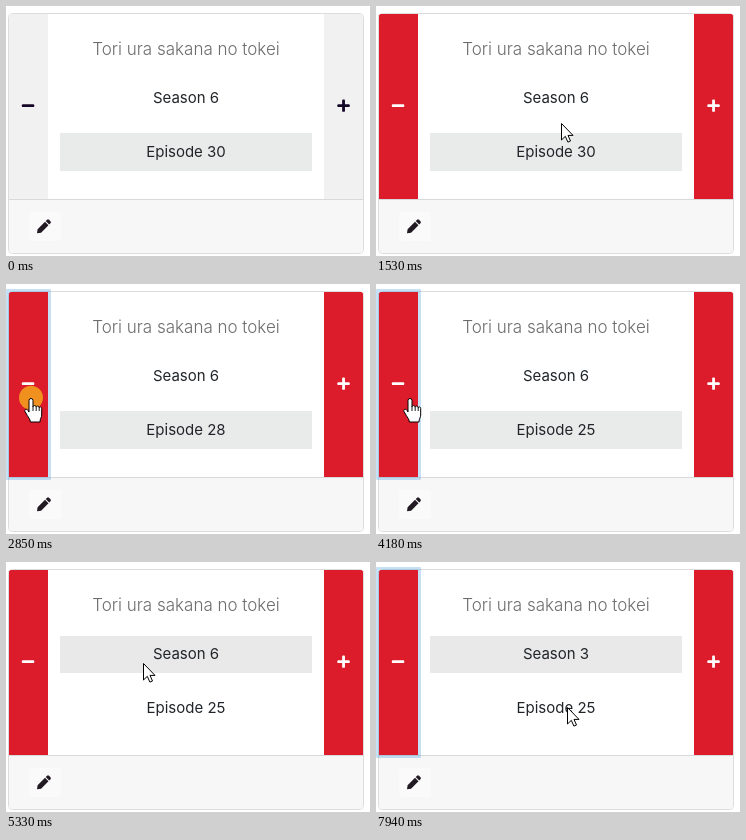
These frames come from a looping animation (364x250 px, 8 s). An HTML page:

```html
<!DOCTYPE html>
<html lang="en">
<head>
<meta charset="utf-8">
<title>Episode counter</title>
<style>
  html, body { margin: 0; width: 100%; height: 100%; overflow: hidden; background: #fff; }
  svg { display: block; width: 364px; height: 250px; }
  text { font: 15px Inter, "Liberation Sans", sans-serif; text-anchor: middle; fill: #212529; }
  .title { font-size: 17px; font-weight: 300; fill: #6c6c6c; }
  .pointer { fill: #fff; stroke: #000; stroke-linejoin: round; }
</style>
</head>
<body>
<svg viewBox="0 0 364 250">
  <rect x="2.5" y="7.5" width="355" height="240" rx="4" fill="#fff" stroke="#dcdcdc"/>
  <path d="M3 193H357V243.500q0 3.500-3.500 3.500H6.500Q3 247 3 243.500Z" fill="#f7f7f7"/>
  <path d="M3 193.500H357" stroke="#d9d9d9"/>
  <rect id="focus" y="5" width="45" height="191" rx="1" fill="#3490dc" opacity=".28"/>
  <g id="sides">
    <path d="M3 193V9.500L4.500 8H42V193Z"/>
    <path d="M318 193V8H355.500L357 9.500V193Z"/>
  </g>
  <g id="icons">
    <rect x="15.900" y="98.300" width="12.300" height="2.800" rx=".9"/>
    <rect x="331.400" y="98.300" width="12.300" height="2.800" rx=".9"/>
    <rect x="336.150" y="93.500" width="2.800" height="12.300" rx=".9"/>
  </g>
  <rect id="seasonBox" x="54" y="74" width="252" height="37" fill="#e9e9e9"/>
  <rect id="episodeBox" x="54" y="127" width="252" height="38" fill="#e9ebea"/>
  <text class="title" x="180" y="49">Tori ura sakana no tokei</text>
  <text id="season" x="180" y="97"></text>
  <text id="episode" x="180" y="151"></text>
  <rect x="23" y="206" width="32" height="29" rx="3" fill="#fafafa"/>
  <path transform="translate(31 213.300)" fill="#211a22"
    d="M8 2.500 .6 9.900 0 13.900 4.100 13.400 11.500 6ZM8.700 1.800 10.100 .5q.9-.9 1.900 0L13.500 2q.9.900 0 1.900L12.200 5.300Z"/>
  <g id="cursor">
    <circle id="click" r="12" cy="-.3" fill="#f0901f"/>
    <path id="arrow" class="pointer" d="M.5 .5V17l3.800-3.700 2.600 5.800 2.600-1.100-2.500-5.600h5Z"/>
    <g id="hand" class="pointer" transform="translate(-.5)">
      <path d="M-1.500 14V2.500a2 2 0 0 1 4 0V9c0-2 3.200-2 3.200.3 0-1.800 3-1.600 3 .5 0-1.500 2.500-1.300 2.500.8V17c0 2.500-1.700 3.500-1.700 7H-.2c0-3-2-4.500-3-6.500l-2.300-4c-1-2 1.700-3.200 3-1.200Z"/>
      <path d="M2.500 9v4M5.700 9.300V13M8.700 9.800V13" fill="none" stroke-width=".9"/>
    </g>
  </g>
</svg>
<script>
  const LOOP = 8000, STEP = 76;
  const $ = id => document.getElementById(id);
  const show = (id, on) => $(id).style.display = on ? '' : 'none';
  const clamp = (v, lo, hi) => Math.max(lo, Math.min(hi, v));
  const ease = p => .3 * p + .7 * p * p * (3 - 2 * p);

  const enter = { x: 222, y: -20 };
  const moves = [
    { at: 614, steps: 6, x: 185, y: 117, bend: 0 },
    { at: 1530, steps: 10, x: 25, y: 114, bend: 14 },
    { at: 4103, steps: 9, x: 176, y: 95, bend: 2 },
    { at: 5097, steps: 9, x: 38, y: 108, bend: 3 },
    { at: 7094, steps: 11, x: 191, y: 145, bend: 0 }
  ];

  // The pointer is sampled in steps along eased, slightly bent lines.
  function position(t) {
    let { x, y } = enter;
    for (const m of moves) {
      const p = clamp(Math.floor((t - m.at) / STEP) / m.steps, 0, 1);
      const e = ease(p);
      x += (m.x - x) * e;
      y += (m.y - y) * e + m.bend * Math.sin(Math.PI * p);
    }
    return { x: Math.round(x), y: Math.round(y) };
  }

  // Repeated clicks: one step down, one step up.
  const burst = (start, count) => ({
    pressed: t => t >= start && t < start + count * 2 * STEP && (t - start) % (2 * STEP) < STEP,
    released: t => clamp(Math.floor((t - start + STEP) / (2 * STEP)), 0, count)
  });
  const episodeClicks = [burst(2380, 2), burst(2850, 3)];
  const selectClick = burst(5020, 1);
  const seasonClicks = [burst(6170, 3)];
  const allClicks = [...episodeClicks, selectClick, ...seasonClicks];
  const total = (bursts, t) => bursts.reduce((sum, b) => sum + b.released(t), 0);

  const mix = (a, b, p) => `rgb(${a.map((v, i) => Math.round(v + (b[i] - v) * p))})`;

  function draw(t) {
    const fade = clamp(Math.floor((t - 614) / STEP) / 4, 0, 1);
    $('sides').setAttribute('fill', mix([241, 241, 241], [220, 28, 42], fade));
    $('icons').setAttribute('fill', mix([20, 6, 38], [255, 255, 255], fade));

    const onSeason = selectClick.released(t) > 0;
    show('seasonBox', onSeason);
    show('episodeBox', !onSeason);
    show('focus', t >= 2380 && t < 5020 || t >= 6170);
    $('season').textContent = 'Season ' + (6 - total(seasonClicks, t));
    $('episode').textContent = 'Episode ' + (30 - total(episodeClicks, t));

    const { x, y } = position(t);
    const overButton = x < 43;
    $('cursor').setAttribute('transform', `translate(${x} ${y})`);
    show('hand', overButton);
    show('arrow', !overButton);
    show('click', allClicks.some(b => b.pressed(t)));
  }

  const origin = performance.now();
  function tick() {
    draw((performance.now() - origin) % LOOP);
    requestAnimationFrame(tick);
  }
  draw(0);
  requestAnimationFrame(tick);
</script>
</body>
</html>
```
